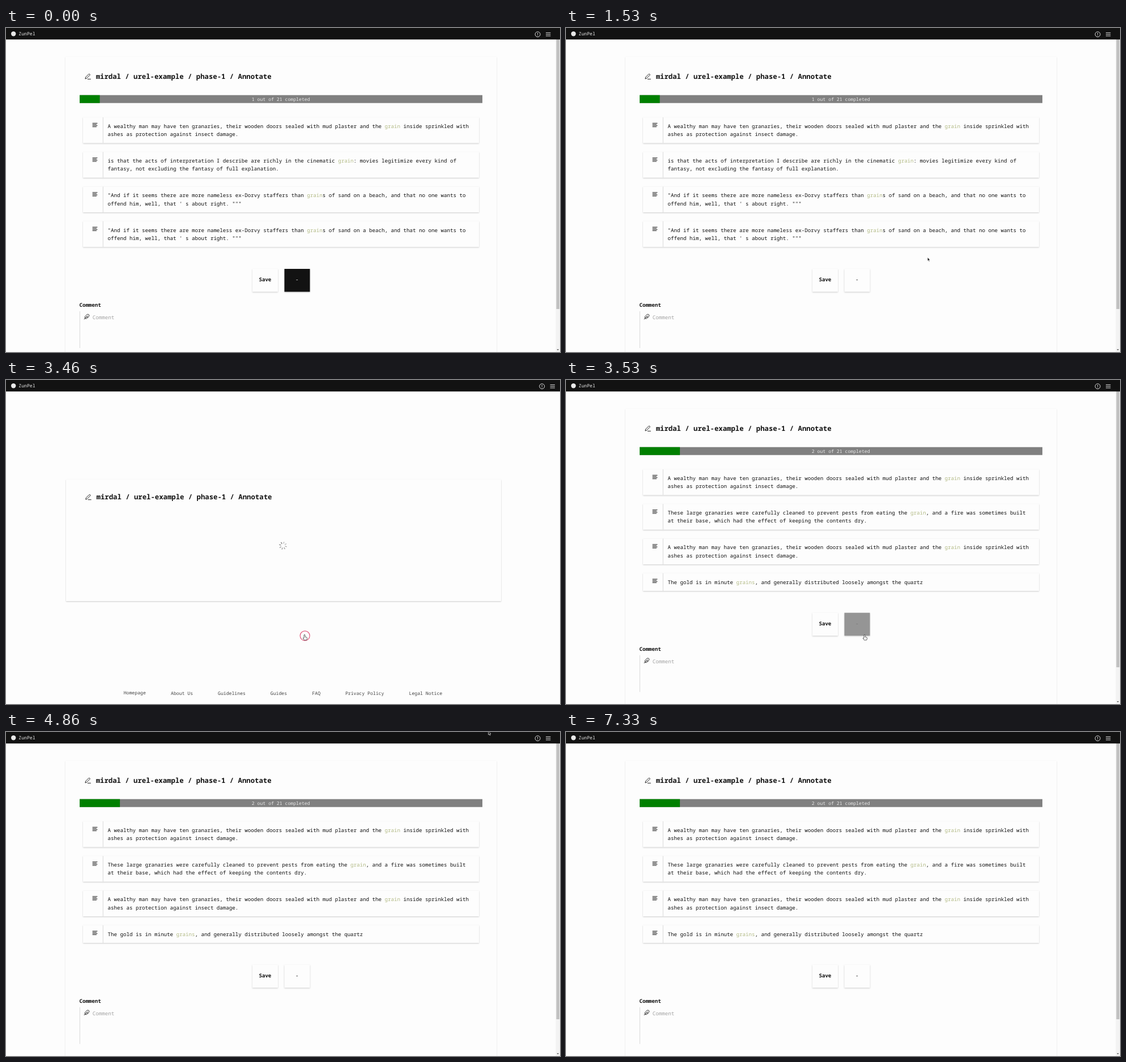
An HTML page for the animation above (8.2 s loop, 978 by 573 pixels).

```html
<!DOCTYPE html>
<html lang="en">
<head>
<meta charset="utf-8">
<title>Annotate</title>
<style>
html, body { margin: 0; height: 100%; overflow: hidden; background: #fdfdfd; }
svg { display: block; width: 100vw; height: 100vh; }
text { font: 500 9.16px "Noto Sans Mono", "DejaVu Sans Mono", monospace; fill: #121212; white-space: pre; text-rendering: geometricPrecision; }
.small { font-size: 8.17px; font-weight: 400; }
.title { font-size: 12.31px; font-weight: 700; }
.bold { font-weight: 600; }
.light { fill: #e8e8e8; }
.hint { fill: #a3a3a3; font-weight: 400; }
.word { fill: #b3bb86; font-weight: 400; }
.foot { fill: #444; }
.card { fill: #fdfdfd; filter: drop-shadow(0 1.5px 1px #0003); }
.panel { fill: #fdfdfd; filter: drop-shadow(0 1px 1px #0002); }
.icon { fill: none; stroke: #222; stroke-width: 1; stroke-linecap: round; stroke-linejoin: round; }
</style>
</head>
<body>
<svg id="stage" viewBox="0 0 978 573" preserveAspectRatio="none"></svg>
<script>
const LOOP = 8200;
const stage = document.getElementById('stage');

const rect = (x, y, w, h, attrs) => `<rect x="${x}" y="${y}" width="${w}" height="${h}" ${attrs}/>`;
const text = (x, y, str, cls = '', attrs = '') => `<text x="${x}" y="${y}" class="${cls}" ${attrs}>${str}</text>`;
const icon = (x, y, d, attrs = '') => `<path class="icon" transform="translate(${x} ${y})" d="${d}" ${attrs}/>`;

const heading = (x, y) =>
  icon(x, y, 'M1 8.5L1.6 6L7.2.4Q8 0 8.8.8T9 2.3L3.5 7.9ZM5.2 9.4H10.4') +
  text(x + 19.7, y + 8.8, 'mirdal / urel-example / phase-1 / Annotate', 'title');

function row(lines, i) {
  const top = 158 + i * 61.25;
  const height = 31.2 + (lines.length - 1) * 14.3;
  return rect(136, top, 699, height, 'class="card"') +
    rect(170.7, top, 1.3, height, 'fill="#e2e2e2"') +
    icon(153, top + 10.4, 'M0 0H8M0 2.1H6.5M0 4.2H8M0 6.3H6.5') +
    lines.map((line, n) => text(179.6, top + 18.8 + n * 14.3,
      line.replace(/\*(.+?)\*/, '<tspan class="word">$1</tspan>'))).join('');
}

function page(id, done, rows, shift) {
  return `<g id="${id}">` +
    rect(105, 51, 761, 540, 'class="panel"') + heading(139, 81) +
    rect(130, 118.7, 711, 14, 'fill="#808080"') +
    rect(130, 118.7, done * 35.55, 14, 'fill="#008000"') +
    text(433.8, 129.4, done + ' out of 21 completed', 'small light') +
    rows.map(row).join('') +
    `<g transform="translate(0 ${-shift})">` +
    rect(435, 426, 45, 40.5, 'class="card"') + text(446.4, 448, 'Save', 'bold') +
    rect(491.5, 426, 45, 40.5, 'class="card button"') + text(511, 448, '-', 'dash') +
    text(129.4, 493, 'Comment', 'bold') +
    rect(129.8, 501, 1, 65, 'fill="#d8d8d8"') +
    icon(138, 506, 'M0 9L6.2 2.8M1.4 7.6V4.2L5 .7Q6.8-.4 8.2.9T8.3 4L4.8 7.6ZM3.7 5.3H7', 'style="stroke-width:.9"') +
    text(152.7, 515.3, 'Comment', 'hint') + '</g>' +
    rect(970.5, 0, 7.5, 573, 'fill="#f3f3f3"') +
    rect(971.5, 8, 5.5, 489 + shift * .77, 'fill="#c1c1c1"') +
    '<path d="M972.3 5L974.2 2.8L976.1 5ZM972.3 568L974.2 570.2L976.1 568Z" fill="#666"/></g>';
}

const wealthy = ['A wealthy man may have ten granaries, their wooden doors sealed with mud plaster and the *grain* inside sprinkled with',
  'ashes as protection against insect damage.'];
const staffers = ['"And if it seems there are more nameless ex-Dorvy staffers than *grain*s of sand on a beach, and that no one wants to',
  'offend him, well, that \' s about right. """'];
const acts = ['is that the acts of interpretation I describe are richly in the cinematic *grain*: movies legitimize every kind of',
  'fantasy, not excluding the fantasy of full explanation.'];
const pests = ['These large granaries were carefully cleaned to prevent pests from eating the *grain*, and a fire was sometimes built',
  'at their base, which had the effect of keeping the contents dry.'];
const gold = ['The gold is in minute *grains*, and generally distributed loosely amongst the quartz'];

const links = [[207.7, 'Homepage'], [291, 'About Us'], [374, 'Guidelines'], [466.8, 'Guides'],
  [540.4, 'FAQ'], [598.9, 'Privacy Policy'], [711.5, 'Legal Notice']];
const spokes = Array.from({ length: 8 }, (_, i) =>
  `<path d="M0-3.6V-7" transform="rotate(${i * 45})" stroke="#555" stroke-width="1.3" opacity="${.4 + i * .05}"/>`).join('');

stage.innerHTML =
  page('first', 1, [wealthy, acts, staffers, staffers], 0) +
  page('second', 2, [wealthy, pests, wealthy, gold], 14.3) +
  '<g id="loading">' + rect(106, 176, 768, 215, 'class="card"') + heading(139.8, 202.3) +
  `<g transform="translate(489 293)"><g id="spinner">${spokes}</g></g>` +
  links.map(([x, name], i) => text(x, i ? 557.3 : 555.5, name, 'small foot')).join('') + '</g>' +
  rect(0, 0, 978, 20.3, 'fill="#121212"') +
  '<circle cx="13.2" cy="10.2" r="4.2" fill="#e8e8e8"/>' + text(22.3, 13, 'ZunPel', 'small light') +
  '<g id="menu" fill="none" stroke="#ddd"><circle cx="938.6" cy="11.2" r="4.5"/>' +
  '<path d="M938.6 8.7V11.6M938.6 12.6V13.6M953 8.4H961.4M953 11.2H961.4M953 14H961.4"/></g>' +
  '<circle id="ring" cx="527.7" cy="452.3" fill="none" stroke="#e0587c" stroke-width="1.2"/>' +
  '<g id="cursor"><path id="arrow" d="M0 0V6.4L1.5 5.1L2.6 7.5L3.6 7L2.6 4.7H4.5Z" fill="#111" stroke="#fff" stroke-width=".6"/>' +
  '<path id="hand" d="M-1 1Q0-1 1 1V4.3L4 5.2Q5 6 4.4 8L3.6 10H-.6L-2.8 6.6Q-2.6 5.4-1 6.6Z" fill="#fff" stroke="#222" stroke-width=".7"/></g>';

const el = id => document.getElementById(id);
const show = (id, on) => { el(id).style.display = on ? '' : 'none'; };
const mix = (a, b, k) => a + (b - a) * k;
const ramp = (t, start, length) => Math.min(1, Math.max(0, (t - start) / length));
const gray = v => `rgb(${v},${v},${v})`;

// time, x, y of the pointer tip
const path = [[200, 527, 450], [600, 640, 290], [1000, 700, 156], [1530, 638.5, 405.5],
  [1860, 553, 452], [2130, 527, 450], [4030, 527, 450], [4860, 851.5, -1.5], [LOOP, 851.5, -1.5]];

function pointer(t) {
  const i = Math.max(1, path.findIndex(p => p[0] >= t));
  const [a, b] = [path[i - 1], path[i]];
  const k = ramp(t, a[0], b[0] - a[0]);
  return [mix(a[1], b[1], k), mix(a[2], b[2], k)];
}

function paintButton(id, hover) {
  const g = el(id);
  g.querySelector('.button').style.fill = gray(mix(253, 18, hover));
  g.querySelector('.dash').style.fill = gray(mix(18, 240, hover));
}

function draw(t) {
  const loading = t >= 3395 && t < 3525;
  show('first', t < 3395);
  show('loading', loading);
  show('second', t >= 3525);
  paintButton('first', 1 - ramp(t, 230, 150) + ramp(t, 1960, 150));
  paintButton('second', ramp(t, 3460, 160) - ramp(t, 4110, 150));
  el('menu').setAttribute('transform', `translate(${loading ? 7.6 : 0} 0)`);
  el('spinner').setAttribute('transform', `rotate(${15 + (t - 3460) * .36})`);

  show('ring', t >= 3330 && t < 3525);
  el('ring').setAttribute('r', mix(5, 8.5, ramp(t, 3330, 130)));

  const onButton = t < 240 || (t > 1920 && t < 4110);
  show('cursor', t >= 200 && t < 6860);
  show('hand', onButton);
  show('arrow', !onButton);
  el('cursor').setAttribute('transform', `translate(${pointer(t)})`);
}

const start = performance.now();
function tick() {
  draw((performance.now() - start) % LOOP);
  requestAnimationFrame(tick);
}
tick();
</script>
</body>
</html>
```
